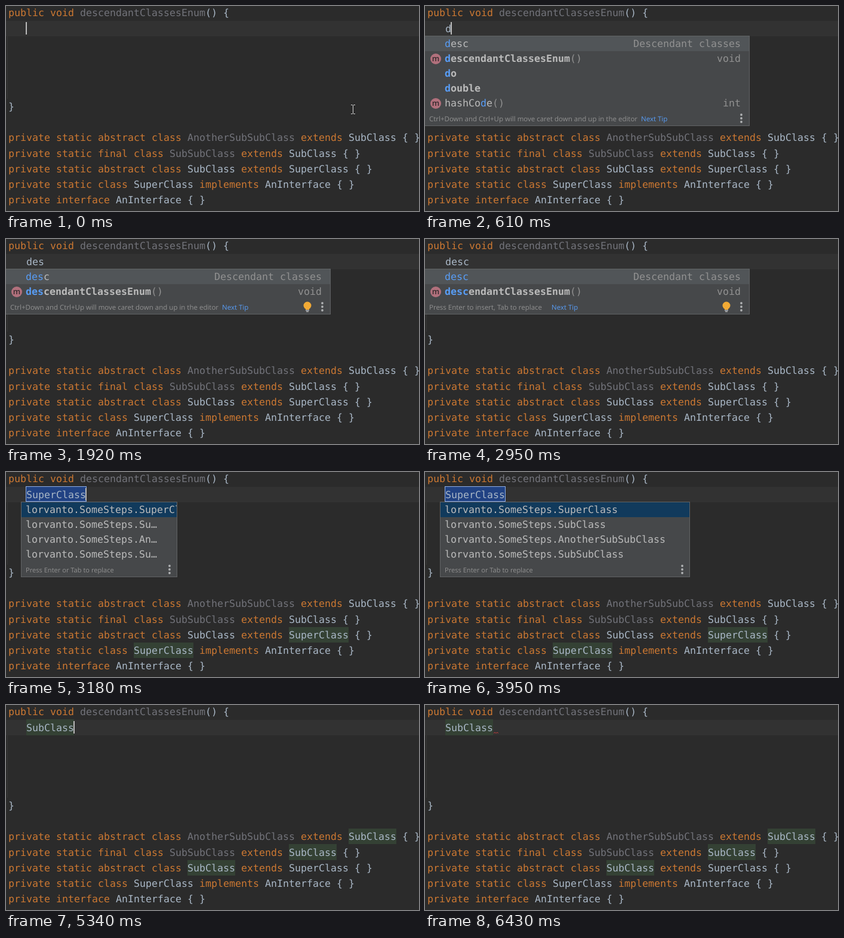
Animation, 692 px wide and 345 px high, one loop 6600 ms. Source, as an HTML page:

```html
<!DOCTYPE html>
<html lang="en">
<head>
<meta charset="utf-8">
<title>Code completion</title>
<style>
  html, body { margin: 0; width: 100%; height: 100%; overflow: hidden; background: #2b2b2b; }
  svg { display: block; width: 692px; height: 345px; }
  text {
    font: 16.61px "DejaVu Sans Mono", "Noto Sans Mono", monospace;
    fill: #a9b7c6; white-space: pre; text-rendering: geometricPrecision;
  }
  .key { fill: #cc7832; }
  .unused { fill: #72737a; }
  .item { fill: #bbb; }
  .dim { fill: #919191; }
  .hit { fill: #589df6; }
  .bold { font-weight: 700; }
  .tip { font: 11.5px "Open Sans", "Noto Sans", sans-serif; }
  .short { font-size: 11.1px; }
  .badge { font: 600 13px "Open Sans", sans-serif; fill: #33292c; text-anchor: middle; }
  .usage { fill: #344134; }
  .caret { fill: #bbb; }
</style>
</head>
<body>
<svg id="stage" viewBox="0 0 692 345" xmlns="http://www.w3.org/2000/svg"></svg>
<script>
const LOOP = 6600, CH = 10, EDGE = '#616365';
const rules = [];

const rect = (x, y, w, h, attrs) => `<rect x="${x}" y="${y}" width="${w}" height="${h}" ${attrs}/>`;
const text = (x, y, body, cls = '') => `<text x="${x}" y="${y}" class="${cls}">${body}</text>`;
const span = (cls, body) => `<tspan class="${cls}">${body}</tspan>`;

// Shows the markup only during the given [from, to] spans (ms).
function during(spans, markup) {
  const name = 'on' + rules.length;
  const stops = spans[0][0] ? ['0%{opacity:0}'] : [];
  for (const [from, to] of spans) {
    stops.push(`${from / LOOP * 100}%{opacity:1}`);
    stops.push(`${to / LOOP * 100}%{opacity:${to < LOOP ? 0 : 1}}`);
  }
  rules.push(`@keyframes ${name}{${stops.join('')}} #${name}{animation:${name} ${LOOP}ms step-end infinite}`);
  return `<g id="${name}">${markup}</g>`;
}

// Editor lines
const rowTop = i => Math.round(26.25 * i - 2);
const baseline = i => Math.round(26.25 * i + 17.45);
const paint = s => s
  .replace(/\b(public|void|private|static|abstract|final|class|extends|implements|interface)\b/g, m => span('key', m))
  .replace(/~(\w+)/g, (_, name) => span('unused', name));
const lines = {
  0: 'public void ~descendantClassesEnum() {',
  6: '}',
  8: 'private static abstract class ~AnotherSubSubClass extends SubClass { }',
  9: 'private static final class ~SubSubClass extends SubClass { }',
  10: 'private static abstract class SubClass extends SuperClass { }',
  11: 'private static class SuperClass implements AnInterface { }',
  12: 'private interface AnInterface { }'
};
const code = Object.entries(lines).map(([i, s]) => text(4, baseline(i), paint(s))).join('');
const usage = (row, col, len) =>
  rect(4 + col * CH, rowTop(row), len * CH, rowTop(row + 1) - rowTop(row), 'class="usage"');
const typed = (col, s) => text(34 + col * CH, baseline(1), s);
const caret = (col, ...spans) => during(spans, rect(33 + col * CH, 27, 2, 21, 'class="caret"'));

// Popups
const rowText = i => 69 + 25 * i;
const dots = (x, y) => [-6, 0, 6].map(d => `<circle cx="${x}" cy="${y + d}" r="1.9" fill="#afb1b3"/>`).join('');
const panel = (x, w, rows) =>
  rect(x + .5, 50.5, w - 1, 25 * rows + 26, `fill="#46484a" stroke="${EDGE}"`);
const badge = i => `<circle cx="18" cy="${64 + 25 * i}" r="9" fill="#b1707c"/>` +
  text(18, 68 + 25 * i, 'm', 'badge');
const bulb = y => `<circle cx="505" cy="${y - 2}" r="6.5" fill="#f2aa35"/>` +
  rect(502, y + 2, 6, 3, 'fill="#f2aa35"') +
  rect(502, y + 5.5, 6, 1.5, 'fill="#afb1b3"') + rect(503, y + 7.5, 4, 1.5, 'fill="#afb1b3"');

const items = {
  desc: ['Descendant classes', ''],
  descendantClassesEnum: ['void', 'bold', true],
  do: ['', 'bold'],
  double: ['', 'bold'],
  hashCode: ['int', '', true]
};
const EDITOR_TIP = 'Ctrl+Down and Ctrl+Up will move caret down and up in the editor';
const INSERT_TIP = 'Press Enter to insert, Tab to replace';

function completion(prefix, names, tip, nextX) {
  const n = names.length, foot = 51 + 25 * n;
  let out = panel(-1, 545, n) + rect(0, 51, 543, 25, 'fill="#515558"');
  names.forEach((name, i) => {
    const [type, cls, method] = items[name];
    const at = name.toLowerCase().indexOf(prefix), end = at + prefix.length;
    const label = name.slice(0, at) + span('hit', name.slice(at, end)) + name.slice(end);
    out += text(33, rowText(i), span(cls, label) + (method ? span('dim', '()') : ''), 'item');
    out += text(529 - type.length * CH, rowText(i), type, 'dim');
    if (method) out += badge(i);
  });
  return out + text(7, foot + 18, tip, 'tip dim') +
    text(nextX, foot + 18, 'Next Tip', 'tip hit') + dots(530, foot + 13);
}

const PACKAGE = 'lorvanto.SomeSteps.';
const classes = ['SuperClass', 'SubClass', 'AnotherSubSubClass', 'SubSubClass'];
const cut = classes.map((s, i) => i ? s.slice(0, 2) + '…' : s.slice(0, 7));

function chooser(width, names) {
  return panel(25, width, 4) +
    during([[0, 4320]], rect(26, 51, width - 2, 25, 'fill="#113a5c"')) +
    during([[4320, LOOP]], rect(26, 76, width - 2, 25, 'fill="#113a5c"')) +
    names.map((s, i) => text(33, rowText(i), PACKAGE + s, 'item')).join('') +
    text(33, 169, 'Press Enter or Tab to replace', 'tip short dim') + dots(width + 12, 164);
}

const picture = [
  rect(0, 25, 692, 26, 'fill="#323232"'),
  rect(2, 51, 1, 105, 'fill="#373737"'),
  during([[3180, 5340]], usage(10, 47, 10) + usage(11, 21, 10) +
    rect(33.5, 24.5, 101, 25, 'fill="#214283" stroke="#8fb0e8"')),
  during([[5340, LOOP]], usage(1, 3, 8) + usage(8, 57, 8) + usage(9, 47, 8) + usage(10, 30, 8)),
  code,

  // Typing
  [...'desc'].map((c, i) => during([[[440, 760, 1380, 2000][i], 3180]], typed(i, c))).join(''),
  during([[3180, 5340]], typed(0, 'SuperClass')),
  during([[5340, LOOP]], typed(0, 'SubClass')),
  during([[5660, LOOP]],
    '<path d="M115 47.5l2-1.5 2 1.5 2-1.5 2 1.5" fill="none" stroke="#bc3f3c"/>'),
  caret(0, [0, 440]),
  caret(1, [440, 760]),
  caret(2, [760, 1380]),
  caret(3, [1380, 1920]),
  caret(4, [2000, 2950]),
  caret(10, [3180, 3950], [4320, 4960]),
  caret(8, [5340, 6430]),

  // Completion list
  during([[520, 760]], completion('d', Object.keys(items), EDITOR_TIP, 362)),
  during([[760, 1460]], completion('de', ['desc', 'descendantClassesEnum', 'hashCode'], EDITOR_TIP, 362)),
  during([[1460, 2070]], completion('des', ['desc', 'descendantClassesEnum'], EDITOR_TIP, 362)),
  during([[2070, 3180]], completion('desc', ['desc', 'descendantClassesEnum'], INSERT_TIP, 212)),
  during([[1300, 1460]], bulb(139)),
  during([[1920, 2070], [2550, 3180]], bulb(114)),

  // Class chooser
  '<clipPath id="narrow"><rect x="25" y="50" width="261" height="128"/></clipPath>',
  during([[3180, 3250]], `<g clip-path="url(#narrow)">${chooser(262, cut)}</g>` +
    rect(286, 50, 1, 127, `fill="${EDGE}"`)),
  during([[3250, 5340]], chooser(419, classes)),

  // Mouse pointer
  during([[0, 440]],
    '<path d="M578 166.5h2.5l1 1 1-1h2.5M581.5 167v14M578 181.5h2.5l1-1 1 1h2.5" fill="none" stroke="#d8d8d8"/>')
].join('');

const style = document.createElement('style');
style.textContent = rules.join('\n');
document.head.append(style);
document.getElementById('stage').innerHTML = picture;
</script>
</body>
</html>
```
